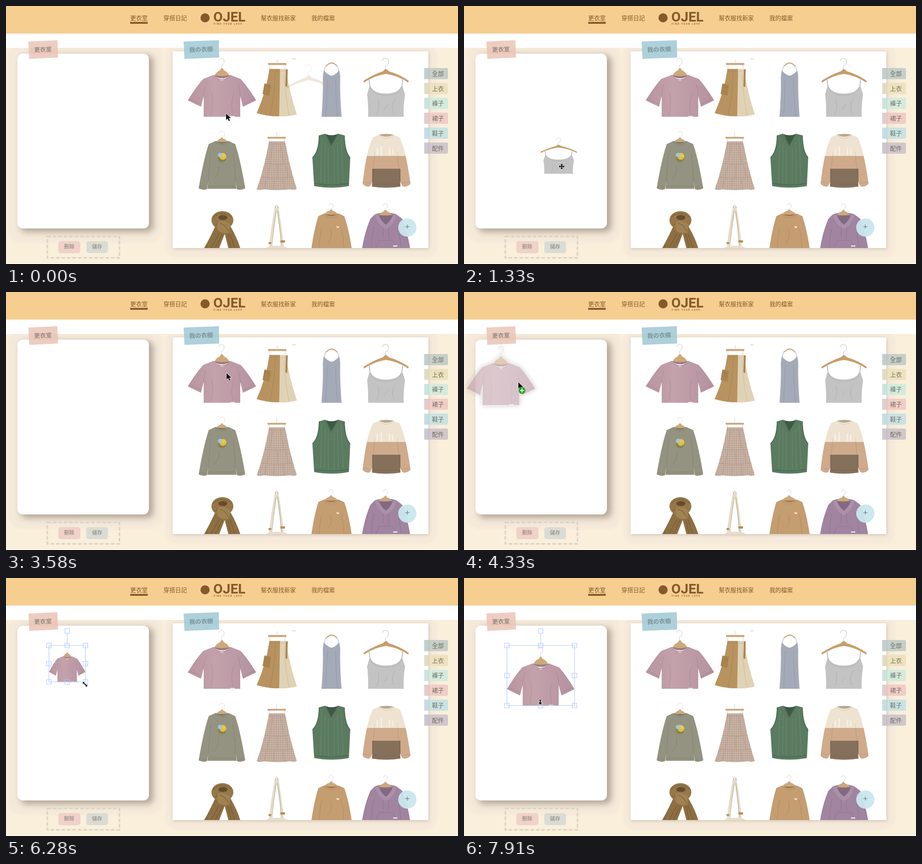
Write an HTML page that moves like this. It is 990 px wide and 566 px high and loops after 8 s.

```html
<!DOCTYPE html>
<html lang="zh-Hant">
<head>
<meta charset="utf-8">
<title>更衣室</title>
<style>
html, body { margin: 0; width: 100%; height: 100%; overflow: hidden; }
svg { display: block; width: 990px; height: 566px; }
text { font-family: "Noto Sans CJK TC", "Noto Sans CJK", "Noto Sans", sans-serif; font-weight: 500; }
.mid { text-anchor: middle; }
.nav { font-size: 12.8px; fill: #85592a; }
.tab text { font-size: 13px; fill: #716c64; }
.fold { fill: none; stroke: #000; stroke-opacity: .11; }
.hook { fill: none; stroke: #c4c4c4; stroke-width: .9; }
.wood { fill: #cda87b; }
.btn { font-size: 11px; font-weight: 700; fill: #a09a91; letter-spacing: .2px; }
#frame { fill: none; stroke: #a9c8fb; stroke-width: 1.1; }
#ghost { opacity: .58; filter: drop-shadow(0 0 3px #fff) drop-shadow(0 0 4px #999); }
#cursor path { stroke-linejoin: round; }
.ink { fill: #111; stroke: #fff; stroke-width: 1.3; paint-order: stroke; }
</style>
</head>
<body>
<svg viewBox="0 0 990 566">
<defs>
  <clipPath id="main"><path d="M0 92H990V566H0Z"/></clipPath>
  <clipPath id="shelf"><path d="M365 99H925V531H365Z"/></clipPath>
  <clipPath id="knit"><path d="M818 282Q833 290 848 282L862 288Q875 312 886 390Q877 399 868 395L863 385L864 396Q833 401 801 396L802 385L798 395Q789 399 781 390Q790 312 804 288Z"/></clipPath>
  <pattern id="check" width="4" height="4" patternUnits="userSpaceOnUse">
    <path fill="#d6c5b8" d="M0 0H4V4H0Z"/><path fill="#8b6650" fill-opacity=".35" d="M0 0H2V4H0ZM0 0H4V2H0Z"/>
  </pattern>
  <linearGradient id="mauve"><stop stop-color="#b8949f"/><stop offset=".4" stop-color="#c3a2ab"/><stop offset="1" stop-color="#b591a0"/></linearGradient>
  <path id="hook" class="hook" d="M0 21V15Q7 11 5.5 5A5.5 5.5 0 0 0-5.5 5"/>
  <path id="yoke" class="wood" d="M-16 16Q-12 8-4 5Q-3 1 0 0Q3 1 4 5Q12 8 16 16Q0 20-16 16Z"/>

  <g id="tee">
    <use href="#hook" x="472" y="115"/>
    <path fill="#987884" d="M455 152Q473 148 491 152Q473 166 455 152Z"/>
    <use href="#yoke" x="473" y="136"/>
    <path fill="url(#mauve)" d="M455 151Q473 170 491 151L514 160Q528 175 548 207L519 221L513 198V243H433V198L427 221L398 207Q418 175 432 160Z"/>
    <path class="fold" d="M454 153Q473 174 492 153M433 198Q433 183 438 172M513 198Q513 183 508 172M402 204L428 216M544 204L518 216M449 240Q455 210 450 190M497 238Q491 215 499 193"/>
    <path fill="#eadde1" d="M470 158h5v3h-5zM469 163h8v1h-8zM491 241h10v2h-10z"/>
  </g>
  <g id="hanger">
    <use href="#hook" transform="translate(831 115) scale(1.2 1.15)"/>
    <path fill="#c89d69" d="M783 164Q805 150 826 143Q832 134 838 143Q862 150 882 164L881 168Q858 152 832 149Q808 152 784 168Z"/>
  </g>
  <g id="cami">
    <use href="#hanger"/>
    <path fill="none" stroke="#b5b5b5" stroke-width="1.8" d="M795 159L797 176M869 159L867 176"/>
    <path fill="#c3c3c3" d="M797 172Q802 192 832 192Q862 192 867 172L874 194Q870 220 871 243H793Q794 220 791 194Z"/>
    <path class="fold" stroke-opacity=".08" d="M798 178Q804 196 832 196Q860 196 866 178M812 238Q820 218 814 205M850 236Q842 220 852 204M828 228L836 216"/>
  </g>
  <g id="plus"><circle cx="8" cy="18" r="7.5" fill="#27a51d"/><path stroke="#fff" stroke-width="2" d="M3.5 18H12.5M8 13.5V22.5"/></g>
</defs>

<path fill="#fff" d="M0 0H990V566H0Z"/>
<path fill="#f3ece1" d="M0 60H990V61.5H0Z"/>
<path fill="#f6ce90" d="M0 0H990V60H0Z"/>
<g class="nav">
  <text x="272" y="30.5">更衣室</text><text x="345" y="30.5">穿搭日記</text>
  <text x="558" y="30.5">幫衣服找新家</text><text x="669" y="30.5">我的檔案</text>
  <path d="M272 35H310.500V39H272Z"/>
  <circle cx="436" cy="26" r="10"/>
  <text x="454" y="34" style="font:700 30px Roboto,sans-serif">OJEL</text>
  <text x="455" y="40.500" style="font:700 4.600px Roboto,sans-serif;letter-spacing:2px">FIND YOUR LOVE</text>
</g>

<g clip-path="url(#main)">
  <path fill="#f9efdb" d="M0 92H990V565H0Z"/>
  <g fill="#f5e9d9" style="filter:blur(2px)">
    <rect x="5" y="82" width="338" height="437" rx="28"/><rect x="349" y="82" width="595" height="470" rx="26"/>
  </g>
  <rect x="31" y="108" width="292" height="388" rx="14" fill="#77695c" opacity=".5" style="filter:blur(7px)"/>
  <rect x="366" y="101" width="560" height="432" fill="#9a8c7c" opacity=".4" style="filter:blur(3.500px)"/>
</g>
<rect x="25" y="104.500" width="288" height="383.500" rx="12" fill="#fff"/>
<path fill="#fff" d="M365 99.500H925V531H365Z"/>

<g clip-path="url(#shelf)">
  <use href="#tee"/>
  <use href="#cami"/>
  <!-- two-tone skirt -->
  <path class="hook" d="M594 124V117M578 130V138M611 130V138"/>
  <path class="wood" d="M574 125H614V129.500H574Z"/>
  <path fill="#b8935f" d="M577 138H602L601 242Q575 243 549 235Q570 188 577 138Z"/>
  <path fill="#e1d2b5" d="M600 138H613Q621 190 637 238Q620 243 598 242Z"/>
  <path fill="#a9834f" d="M566 170L580 173L577 197L562 193ZM613 139H617L616 178L612 176Z"/>
  <path class="fold" d="M577 143H613M566 176L579 179M590 145Q588 200 578 240M609 150Q612 200 620 240M600 145L598 241"/>
  <!-- slip dress -->
  <path fill="none" stroke="#ccaa7d" stroke-width="2.500" d="M701 132Q706 126 713 125Q721 126 725 132"/>
  <path fill="none" stroke="#a2a7b4" d="M700 131L695 150M726 131L731 150"/>
  <path fill="#a5aab8" d="M696 141Q704 151 713 153Q722 151 730 141L732 155Q731 195 735 243H691Q695 195 694 155Z"/>
  <path class="fold" stroke-opacity=".08" d="M704 160Q702 200 700 243M722 160Q722 200 726 243"/>
  <!-- olive sweatshirt -->
  <use href="#hook" x="473" y="275" opacity=".6"/>
  <path fill="#737261" d="M459 297Q473 291 487 297Q473 309 459 297Z"/>
  <use href="#yoke" transform="translate(473 288) scale(.75 .6)"/>
  <path fill="#949280" d="M459 296Q473 307 487 296L502 303Q513 335 524 400Q515 405 506 402L503 385L505 401H441L443 385L440 402Q431 405 422 400Q433 335 444 303Z"/>
  <path class="fold" d="M458 298Q473 312 488 298M443 385L448 322M503 385L498 322M442 395H504M423 396L440 398M506 398L523 396M455 380Q470 365 465 350"/>
  <circle cx="473" cy="334" r="9" fill="#8d8752"/><circle cx="475" cy="330" r="7.500" fill="#ecc842"/><circle cx="469" cy="327" r="5" fill="#a4c6cc"/>
  <path class="fold" stroke-opacity=".35" d="M465 333H482M465 337H482M469 331V341M473 331V342M478 331V341"/>
  <!-- gingham skirt -->
  <path class="hook" d="M593 287V277M577 291V298M610 291V298"/>
  <path class="wood" d="M573 287H613V291H573Z"/>
  <path fill="url(#check)" d="M576 297H611Q617 325 621 345L629 375Q633 390 637 401Q630 405 623 402Q593 406 565 402Q556 405 549 402Q554 388 558 375L566 345Q571 325 576 297Z"/>
  <path class="fold" stroke-opacity=".25" d="M576 303H612M566 345Q593 350 621 345M558 375Q593 381 629 375M584 305L578 344M602 305L608 344M578 350L572 375M595 350V376M613 350L618 375M570 380L566 402M588 380L585 403M607 380L610 403"/>
  <!-- green vest -->
  <path fill="#3d5843" d="M700 281Q713 286 726 281L713 307Z"/>
  <path fill="#5a7b60" d="M685 284L699 280L712 306L727 280L742 284Q742 318 754 332L751 395Q712 402 675 395L671 332Q685 318 685 284Z"/>
  <path fill="none" stroke="#6f9074" stroke-dasharray="3 1.500" stroke-width="1.300" d="M692 290Q690 330 689 388M699 300L698 389M706 310V390M719 310V390M726 300L728 389M734 290Q736 330 738 388"/>
  <path fill="none" stroke="#48694f" stroke-width="1.500" d="M686 285Q686 319 672 332M741 285Q742 319 753 332M699 281L712 306L727 281M675 389Q712 396 751 389"/>
  <!-- striped sweater -->
  <g clip-path="url(#knit)">
    <path fill="#eee3d1" d="M780 280H887V400H780Z"/>
    <path fill="#cfaa8b" d="M780 329H887V400H780Z"/>
    <path fill="#85705c" d="M802 357H864V400H802Z"/>
    <path class="fold" d="M802 385L808 320M863 385L857 320M802 391H864M783 386L799 389M867 389L885 386M817 284Q833 297 849 284"/>
    <path stroke="#f7f1e7" stroke-width="2.500" d="M813 312V326M822 308V328M840 310V327M847 313V326"/>
  </g>
  <path fill="#b9a68c" d="M817 282Q833 279 849 282Q833 291 817 282Z"/>
  <!-- scarf -->
  <path fill="#8d6f43" d="M458 484Q445 512 434 531H467L479 500L487 531H513Q506 508 492 484Z"/>
  <ellipse cx="474" cy="470" rx="24" ry="20" fill="#967749"/>
  <ellipse cx="475" cy="464" rx="10" ry="5.500" fill="#654d2d"/>
  <path fill="#a18252" d="M463 474Q476 467 491 479L489 497Q475 501 464 492Z"/>
  <path fill="none" stroke="#5f4625" stroke-opacity=".5" stroke-width="1.300" d="M453 465Q470 446 494 463M456 478Q464 484 462 474M468 477Q480 478 487 494M467 499L449 531M474 500L458 531M491 500L501 531M486 500L493 531M440 525V531"/>
  <!-- shoulder bag -->
  <path fill="none" stroke="#e5dbc7" stroke-width="5" d="M592 440Q584 480 578 531M594 440Q602 485 606 531"/>
  <path fill="none" stroke="#a08a68" stroke-width=".8" d="M589 443Q592 431 597 443M592 450Q586 490 582 528M595 450Q601 490 603 528"/>
  <path fill="#e8dfcd" d="M571 531Q573 526 593 526Q613 526 616 531Z"/>
  <path fill="#b48f52" d="M601 514H611V519H601ZM575 518H581V522H575Z"/>
  <!-- tan sweatshirt -->
  <use href="#hook" transform="translate(712 434) scale(.8)"/>
  <path fill="#9b754b" d="M697 456Q712 451 728 456Q712 468 697 456Z"/>
  <use href="#yoke" transform="translate(712 446) scale(.9 .65)"/>
  <path fill="#c49d70" d="M697 455Q712 467 728 455L741 461Q751 490 757 531H669Q675 490 684 461Z"/>
  <path class="fold" d="M696 457Q712 473 729 457M686 531Q687 505 692 487M740 531Q739 505 734 487M705 520Q717 505 710 490"/>
  <path fill="#eee4d5" d="M723 482l4 2 3-1-1 4-4 0z"/>
  <!-- hoodie -->
  <use href="#hook" transform="translate(831 434) scale(.8)"/>
  <path fill="#a084a0" d="M808 457Q832 449 855 457L868 467Q879 495 885 531H780Q786 495 798 467Z"/>
  <path fill="#836a82" d="M817 460Q832 454 847 460Q842 472 832 480Q822 472 817 460Z"/>
  <use href="#yoke" transform="translate(831 447) scale(.85 .7)"/>
  <path fill="#ab90a9" d="M808 457Q813 480 832 489Q851 480 855 457L847 460Q842 473 832 480Q822 473 817 460Z"/>
  <path class="fold" stroke-opacity=".2" d="M826 487V507M838 487V510M800 531Q802 500 806 485M865 531Q862 500 859 485M810 531L818 514H847L855 531"/>
  <path fill="#e7dfe6" d="M848 525H857V528H848Z"/>
  <path fill="#777" opacity=".5" d="M628 115h2v2h-2zM632 115h2v2h-2z"/>
</g>

<path fill="#ebc2b4" fill-opacity=".82" d="M49 78L112.500 75L114 113L51 116Z"/>
<path fill="#a5cbd6" fill-opacity=".9" d="M389 78L466 75L467 113L391 116Z"/>
<g class="mid" fill="#958b86" font-size="13">
  <text transform="translate(81 100) rotate(-2)" font-size="12.800" style="font-weight:700">更衣室</text>
  <text transform="translate(427.500 100) rotate(-2)" style="font-weight:700" fill="#7d949a">我の衣櫥</text>
</g>
<g id="tabs" class="tab"></g>
<circle cx="879" cy="486" r="20" fill="#cae7ee" fill-opacity=".95"/>
<path stroke="#7f8c8e" stroke-width="1.500" d="M874.500 484H883.500M879 479.500V488.500"/>
<rect x="90.500" y="505.500" width="158" height="47" fill="none" stroke="#dcd4c5" stroke-width="3.500" stroke-dasharray="8 4"/>
<g id="del">
  <rect x="115" y="516" width="47.500" height="26" rx="5" fill="#f2d1c8" stroke="#e3dbd0"/>
  <text class="btn mid" x="138.500" y="532">刪除</text>
</g>
<rect x="176" y="516" width="47.500" height="26" rx="5" fill="#d9dcd4"/>
<text class="btn mid" x="199.500" y="532">儲存</text>

<g id="tip">
  <rect x="91" y="461" width="226" height="33" rx="6" fill="#fffdfd" stroke="#f1c6c8" stroke-width="3"/>
  <text x="106" y="482" font-size="12" fill="#a6a4a4" style="font-weight:700;letter-spacing:.9px">TIP: 記得先選取物件再按刪除唷！</text>
</g>
<use id="item"/>
<path id="frame"/>
<use id="trace" href="#hanger" x="-169" y="14" opacity=".24"/>
<use id="ghost"/>
<g id="cursor">
  <path class="ink" data-kind="arrow" d="M0 0V14L3.500 11L6 16.500L8.500 15.500L6 10H10.500Z"/>
  <path class="ink" data-kind="move" d="M0-6.500L3-3H1V-1H3V-3L6.500 0L3 3V1H1V3H3L0 6.500L-3 3H-1V1H-3V3L-6.500 0L-3-3V-1H-1V-3H-3Z"/>
  <path data-kind="hand" fill="#fff" stroke="#111" stroke-width="1.200" d="M-4-6Q-2-8-1-5L0-1V-3Q2-4 2.500-2Q4-3 4.500-1Q6-1 6 1V4L4 8H-2L-6 2Q-5 0-3 2Z"/>
  <path class="ink" data-kind="corner" d="M-5-5H-0.500L-2-3.500L3.500 2L5 .5V5H.5L2 3.500L-3.500-2L-5-.5Z"/>
  <path class="ink" data-kind="edge" d="M-3-5H3V-3.500H1V1H4L0 6L-4 1H-1V-3.500H-3Z"/>
  <use id="badge" href="#plus"/>
</g>
</svg>
<script>
const $ = id => document.getElementById(id);
const show = (el, on) => el.style.display = on ? '' : 'none';

const tabs = [['全部', '#c5cfc8'], ['上衣', '#ece2bd'], ['褲子', '#d3ebdc'],
              ['裙子', '#f0cdc6'], ['鞋子', '#c9e2e2'], ['配件', '#d1c7ca']];
$('tabs').innerHTML = tabs.map(([name, color], i) => {
  const y = 136 + i * 32.7;
  return `<path fill="${color}" d="M916 ${y}h49q3 0 3 3v18.500q0 3-3 3h-49z"/>
    <path fill="#667" opacity=".1" d="M925 ${y}h2v24.500h-2z"/>
    <path fill="#bcd" opacity=".25" d="M916 ${y}h9v24.500h-9z"/>
    <text x="933" y="${y + 17}">${name}</text>`;
}).join('');

// Pointer route: step, x, y
const route = [[0, 482, 236], [1, 420, 256], [3, 270, 310], [5, 197, 328], [7, 208, 337], [8, 208, 337],
  [9, 214, 352], [11, 214, 355], [13, 205, 372], [17, 185, 408], [18, 150, 520], [19, 147, 528], [20, 147, 528],
  [21, 230, 450], [22, 390, 330], [23, 528, 215], [24, 483, 178], [25, 489, 184], [26, 489, 184],
  [27, 380, 190], [29, 119, 198], [30, 140, 230], [32, 197, 300], [33, 199, 309], [35, 199, 309],
  [39, 138, 207], [40, 138, 207], [42, 173, 233], [47, 242, 300], [48, 242, 305], [49, 168, 299], [50, 168, 288], [53, 167, 272]];
const kinds = [[9, 'arrow'], [13, 'move'], [18, 'arrow'], [21, 'hand'], [33, 'arrow'], [42, 'move'], [49, 'corner'], [99, 'edge']];

const ramp = (k, k0, k1, a, b) => a + (b - a) * Math.min(1, Math.max(0, (k - k0) / (k1 - k0)));

function pointer(k) {
  const i = Math.max(1, route.findIndex(r => r[0] >= k));
  const [k0, x0, y0] = route[i - 1], [k1, x1, y1] = route[i];
  return [ramp(k, k0, k1, x0, x1), ramp(k, k0, k1, y0, y1)];
}

function selection(x, y, w, h) {
  const cx = x + w / 2, cy = y + h / 2, r = x + w, b = y + h;
  const spots = [[x, y], [cx, y], [r, y], [x, cy], [r, cy], [x, b], [cx, b], [r, b], [cx, y - 32]];
  return `M${x} ${y}h${w}v${h}h${-w}zM${cx} ${y}v-27` +
    spots.map(([u, v]) => `M${u - 5} ${v - 5}h10v10h-10z`).join('');
}

function draw(k) {
  const [px, py] = pointer(k);
  const kind = kinds.find(e => k < e[0])[1];
  $('cursor').setAttribute('transform', `translate(${px} ${py})`);
  document.querySelectorAll('[data-kind]').forEach(p => show(p, p.dataset.kind === kind));

  const dragCami = k > 0 && k < 8, dragTee = k > 26 && k < 32, drag = dragCami || dragTee;
  show($('trace'), k === 0);
  show($('ghost'), drag);
  show($('badge'), drag && px < 313);
  if (drag) {
    const [gx, gy] = dragTee ? [511, 193] : [845, 225];
    $('ghost').setAttribute('href', dragTee ? '#tee' : '#cami');
    $('ghost').setAttribute('transform', `translate(${px - gx} ${py - gy})`);
  }

  const hover = k > 17 && k < 21;
  show($('tip'), hover);
  $('del').setAttribute('transform', hover ? 'translate(139 529) scale(1.130) translate(-139 -529)' : '');
  $('del').firstElementChild.setAttribute('fill', hover ? '#f1c9c5' : '#f2d1c8');

  const cami = k > 7 && k < 20, tee = k > 31;
  show($('item'), cami || tee);
  show($('frame'), cami && k > 10 || k > 33);
  if (!cami && !tee) return;
  const size = ramp(k, 42, 47, 80, 148);
  const box = cami ? [167.5, 288, 80, 80] :
    [ramp(k, 35, 39, 155.5, 94), ramp(k, 35, 39, 250, 148), size, k > 48 ? ramp(k, 49, 53, 148, 132) : size];
  const [x, y, w, h] = box;
  const [left, width] = cami ? [783, 99] : [398, 150];
  $('item').setAttribute('href', cami ? '#cami' : '#tee');
  $('item').setAttribute('transform', `translate(${x} ${y}) scale(${w / width} ${h / 131}) translate(${-left} -112)`);
  $('frame').setAttribute('d', selection(...box));
}

function tick() {
  const t = performance.now() % 8000;
  draw(Math.min(53, Math.floor((t * 1.004 + 15) / 150)));
  requestAnimationFrame(tick);
}
tick();
</script>
</body>
</html>
```
